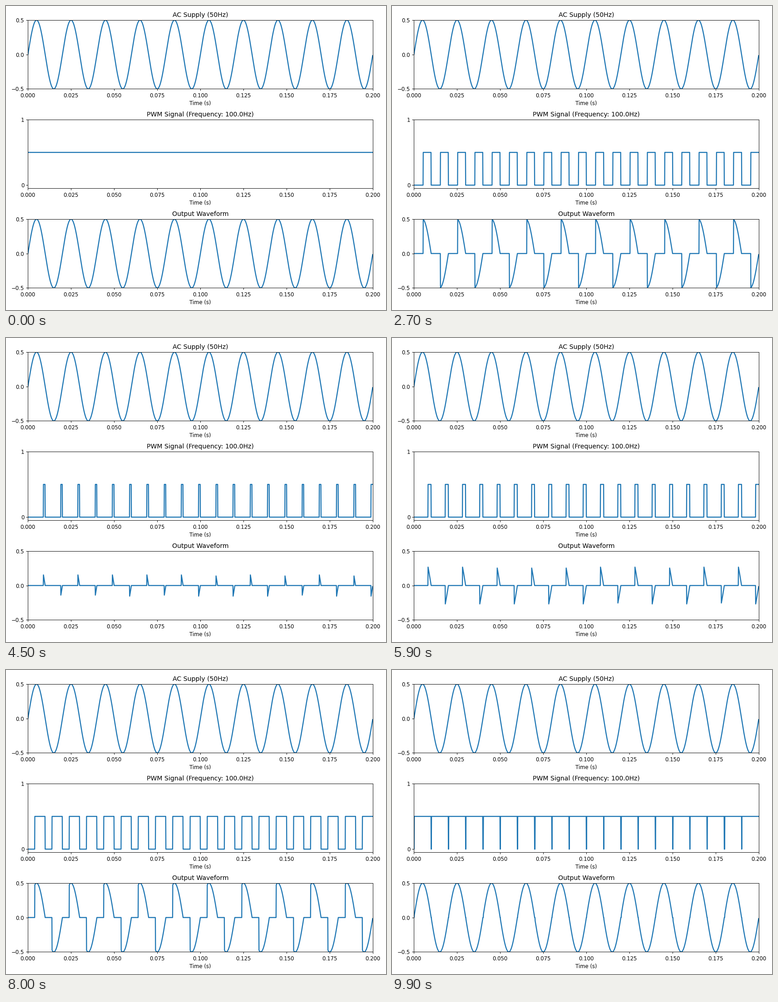
These frames come from a looping animation (837 px wide and 669 px high, 10 s). A matplotlib script:

```python
import numpy as np
import matplotlib.pyplot as plt
from matplotlib.animation import FuncAnimation

W, H = 837, 669
FRAMES = 100
MAINS = 50
PWM_FREQ = 100.0
STEP = 0.0002  # extra firing delay per frame, in seconds

# Panel edges and spacing in pixels
LEFT, RIGHT, TOP, BOTTOM, GAP = 48.3, 807.9, 31.1, 620.4, 67.6
panel_height = (BOTTOM - TOP - 2 * GAP) / 3

plt.rcParams["font.family"] = "DejaVu Sans"

t = np.arange(2000) * 0.0001
ac = 0.5 * np.sin(2 * np.pi * MAINS * t)
phase = t % (1 / PWM_FREQ)

fig, axes = plt.subplots(3, 1, figsize=(10.009, 8), dpi=83.625)
fig.subplots_adjust(left=LEFT / W, right=RIGHT / W, top=1 - TOP / H,
                    bottom=1 - BOTTOM / H, hspace=GAP / panel_height)


def panel(ax, title, ylim, yticks):
    line, = ax.plot(t, ac, lw=2)
    ax.set_title(title)
    ax.set_xlabel("Time (s)")
    ax.set_xlim(0, 0.2)
    ax.set_xticks(np.linspace(0, 0.2, 9))
    ax.set_ylim(*ylim)
    ax.set_yticks(yticks)
    return line


wave = ((-0.5, 0.5), [-0.5, 0.0, 0.5])
panel(axes[0], f"AC Supply ({MAINS}Hz)", *wave)
pwm_line = panel(axes[1], f"PWM Signal (Frequency: {PWM_FREQ}Hz)", (-0.05, 1), [0, 1])
out_line = panel(axes[2], "Output Waveform", *wave)


def update(i):
    # The delay grows to a full half cycle, then shrinks back
    delay = min(i, FRAMES - i) * STEP
    on = phase >= delay
    pwm_line.set_ydata(np.where(on, 0.5, 0.0))
    out_line.set_ydata(np.where(on, ac, 0.0))
    return pwm_line, out_line


anim = FuncAnimation(fig, update, frames=FRAMES, interval=100, repeat=True)
plt.show()
```
